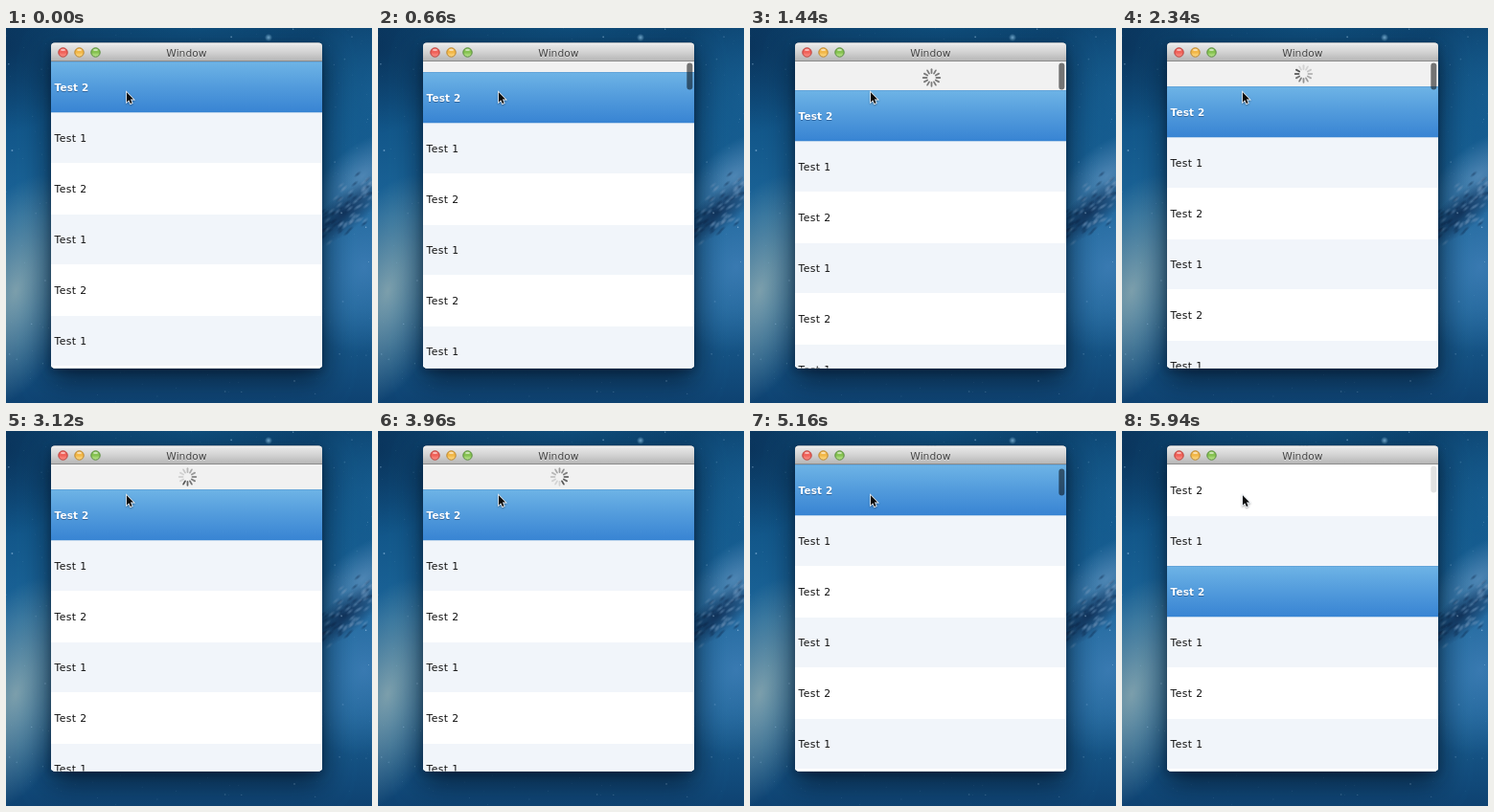
Animation of 382 by 392 pixels, one loop 6 s. Source, as an HTML page with a canvas:

```html
<!DOCTYPE html>
<html lang="en">
<head>
<meta charset="utf-8">
<title>Pull to refresh</title>
<style>
html, body { margin: 0; width: 100%; height: 100%; overflow: hidden; background: #0f4674; }
canvas { display: block; }
</style>
</head>
<body>
<canvas id="stage" width="382" height="392"></canvas>
<script>
const W = 382, H = 392, LOOP = 6000, STEP = 60;
const WIN = { x: 47, y: 15.5, w: 283, h: 340 }, TOP = 35, ROW = 53, REST = 26;
const FONT = '"DejaVu Sans", sans-serif';
const ctx = document.getElementById('stage').getContext('2d');

const clamp = v => Math.max(0, Math.min(1, v));
const part = (t, a, b) => clamp((t - a) / (b - a));
const easeOut = p => 1 - (1 - p) ** 3;
const easeBoth = p => p * p * (3 - 2 * p);

function vertical(c, y0, y1, ...colors) {
  const g = c.createLinearGradient(0, y0, 0, y1);
  colors.forEach((color, i) => g.addColorStop(i / (colors.length - 1), color));
  return g;
}

function rounded(c, x, y, w, h, r) {
  c.beginPath();
  c.roundRect(x, y, w, h, r);
}

function glow(c, x, y, rx, ry, turn, rgb, alpha) {
  c.save();
  c.translate(x, y);
  c.rotate(turn);
  c.scale(rx, ry);
  const g = c.createRadialGradient(0, 0, 0, 0, 0, 1);
  g.addColorStop(0, `rgba(${rgb},${alpha})`);
  g.addColorStop(0.5, `rgba(${rgb},${alpha * 0.5})`);
  g.addColorStop(1, `rgba(${rgb},0)`);
  c.fillStyle = g;
  c.fillRect(-1, -1, 2, 2);
  c.restore();
}

// Night sky and window shadow never change, so they are painted once.
function paintSky() {
  const sky = document.createElement('canvas');
  sky.width = W;
  sky.height = H;
  const c = sky.getContext('2d');
  c.fillStyle = vertical(c, 0, H, '#0c426e', '#115588', '#1c6599', '#1a5f92', '#0e4271');
  c.fillRect(0, 0, W, H);
  glow(c, 0, 20, 80, 90, 0, '8,42,78', 0.6);
  glow(c, 200, 0, 130, 40, 0, '16,84,132', 0.6);
  glow(c, 382, 70, 70, 110, 0, '26,100,152', 0.6);
  glow(c, 374, 250, 70, 90, 0.2, '62,126,182', 0.85);
  glow(c, 10, 275, 65, 125, 0.3, '134,165,174', 0.9);
  glow(c, 372, 155, 60, 32, -0.7, '96,146,190', 0.75);
  glow(c, 354, 193, 52, 19, -0.7, '16,48,88', 0.95);

  let seed = 11;
  const random = () => (seed = seed * 16807 % 2147483647) / 2147483647;
  for (let i = 0; i < 420; i++) {
    const x = random() * W, y = random() * H, r = 0.25 + random() ** 6 * 0.75;
    c.fillStyle = `rgba(170,210,240,${0.15 + random() * 0.5})`;
    c.beginPath();
    c.arc(x, y, r, 0, 7);
    c.fill();
  }
  for (let i = 0; i < 90; i++) {
    const along = random(), off = random() - random();
    const tint = random() < 0.5 ? '14,44,82' : '110,150,190';
    glow(c, 328 + 56 * along + 14 * off, 216 - 52 * along + 22 * off, 5, 2, -0.7, tint, 0.5);
  }
  glow(c, 274, 10, 4, 4, 0, '150,205,240', 0.8);

  for (const [blur, dy, alpha] of [[30, 11, 0.7], [8, 3, 0.25]]) {
    c.shadowColor = `rgba(0,8,24,${alpha})`;
    c.shadowBlur = blur;
    c.shadowOffsetY = dy;
    c.fillStyle = '#999';
    rounded(c, WIN.x, WIN.y, WIN.w, WIN.h, 4);
    c.fill();
  }
  return sky;
}

function pullAt(t) {
  if (t < 660) return 11 * part(t, 240, 660);
  if (t < 1440) return 11 + 19 * part(t, 660, 1440);
  if (t < 1920) return 30 + part(t, 1440, 1740);
  if (t < 4500) return 31 - (31 - REST) * easeOut(part(t, 1860, 2280));
  return REST * (1 - easeBoth(part(t, 4500, 5040)));
}

function label(text, x, y, font, spacing, color, shadow) {
  ctx.font = font + ' ' + FONT;
  ctx.letterSpacing = spacing;
  ctx.fillStyle = shadow;
  ctx.fillText(text, x, y + 1);
  ctx.fillStyle = color;
  ctx.fillText(text, x, y);
}

function drawRows(pull, selected) {
  ctx.fillStyle = '#fff';
  ctx.fillRect(WIN.x, TOP + pull, WIN.w, H);
  for (let i = 0; i < 7; i++) {
    const y = TOP + pull + i * ROW, name = i % 2 ? 'Test 1' : 'Test 2';
    if (i === selected) {
      ctx.fillStyle = vertical(ctx, y, y + ROW, '#6eb4e6', '#529bdc', '#3884d3');
      ctx.fillRect(WIN.x, y, WIN.w, ROW);
      ctx.fillStyle = '#62a4d9';
      ctx.fillRect(WIN.x, y, WIN.w, 1);
      ctx.fillStyle = '#bdd5ec';
      ctx.fillRect(WIN.x, y + ROW, WIN.w, 1);
      label(name, 50.5, y + 31, 'bold 10.4px', '0.2px', '#fff', 'rgba(20,60,110,.55)');
    } else {
      ctx.fillStyle = i % 2 ? '#f1f5fa' : '#fff';
      ctx.fillRect(WIN.x, y + 1, WIN.w, ROW - 1);
      label(name, 50.5, y + 31, '10.8px', '0.4px', '#111', 'transparent');
    }
  }
}

function drawSpinner(t, pull) {
  const spinning = t >= 1920;
  const head = 10 + Math.floor((t - 2340) / 83.3);
  const shown = clamp((pull - 12) / 12);
  ctx.save();
  ctx.translate(189.5, TOP + pull - 13);
  ctx.lineWidth = 1.8;
  ctx.lineCap = 'round';
  for (let i = 0; i < 12; i++) {
    const age = ((head - i) % 12 + 12) % 12;
    const alpha = spinning ? Math.max(0.14, 0.72 - age * 0.065) : 0.55 * shown;
    ctx.save();
    ctx.rotate(i * Math.PI / 6);
    ctx.strokeStyle = `rgba(30,30,30,${alpha})`;
    ctx.beginPath();
    ctx.moveTo(0, -5);
    ctx.lineTo(0, -8.8);
    ctx.stroke();
    ctx.restore();
  }
  ctx.restore();
}

function drawScroller(t, pull) {
  let alpha = 0;
  if (t >= 300 && t < 3060) alpha = 1 - part(t, 2760, 3060);
  if (t >= 4500) alpha = 1 - part(t, 5760, 5990);
  const y = t >= 4500 && t < 5880 ? 39.5 - 3 * pull / REST : 36.5;
  ctx.fillStyle = `rgba(0,0,0,${0.52 * alpha})`;
  rounded(ctx, 322.3, y, 6, 28, 3);
  ctx.fill();
}

function drawTitleBar() {
  ctx.fillStyle = vertical(ctx, WIN.y, TOP, '#ececec', '#d2d2d2', '#b3b3b3');
  ctx.fillRect(WIN.x, WIN.y, WIN.w, TOP - WIN.y);
  ctx.fillStyle = '#f6f6f6';
  ctx.fillRect(WIN.x, WIN.y, WIN.w, 1);
  ctx.fillStyle = '#8c8c8c';
  ctx.fillRect(WIN.x, TOP - 1, WIN.w, 1);
  [['#b93a35', '#f0625a', '#ff9f95'], ['#b8822a', '#f2b748', '#ffe59a'], ['#55883a', '#86c251', '#cdf0a0']]
    .forEach(([edge, body, light], i) => {
      const x = 59.5 + 17 * i;
      ctx.fillStyle = vertical(ctx, 20, 31, body, body, light);
      ctx.strokeStyle = edge;
      ctx.lineWidth = 1;
      ctx.beginPath();
      ctx.arc(x, 25.5, 4.7, 0, 7);
      ctx.fill();
      ctx.stroke();
      ctx.fillStyle = 'rgba(255,255,255,.55)';
      ctx.beginPath();
      ctx.ellipse(x, 22.9, 2.4, 1.2, 0, 0, 7);
      ctx.fill();
    });
  label('Window', 167.3, 29.5, '10.7px', '0px', '#444', 'rgba(255,255,255,.5)');
}

const arrow = new Path2D('M0 0V12L2.8 9.4L4.8 14L6.8 13.1L4.8 8.7H8.6Z');
function drawCursor() {
  ctx.save();
  ctx.translate(126, 67.2);
  ctx.scale(0.82, 0.85);
  ctx.shadowColor = 'rgba(0,0,0,.35)';
  ctx.shadowBlur = 2;
  ctx.shadowOffsetY = 1;
  ctx.lineWidth = 2;
  ctx.strokeStyle = '#eef3f8';
  ctx.stroke(arrow);
  ctx.shadowColor = 'transparent';
  ctx.fillStyle = '#0a0a0a';
  ctx.fill(arrow);
  ctx.restore();
}

const sky = paintSky();
function draw(now) {
  const t = Math.floor(now % LOOP / STEP) * STEP;
  const pull = pullAt(t);
  ctx.drawImage(sky, 0, 0);
  ctx.save();
  rounded(ctx, WIN.x, WIN.y, WIN.w, WIN.h, 4);
  ctx.clip();
  ctx.fillStyle = '#f1f1f1';
  ctx.fillRect(WIN.x, TOP, WIN.w, H);
  drawSpinner(t, pull);
  drawRows(pull, t < 5880 ? 0 : 2);
  drawScroller(t, pull);
  drawTitleBar();
  ctx.restore();
  drawCursor();
  requestAnimationFrame(draw);
}
requestAnimationFrame(draw);
</script>
</body>
</html>
```
